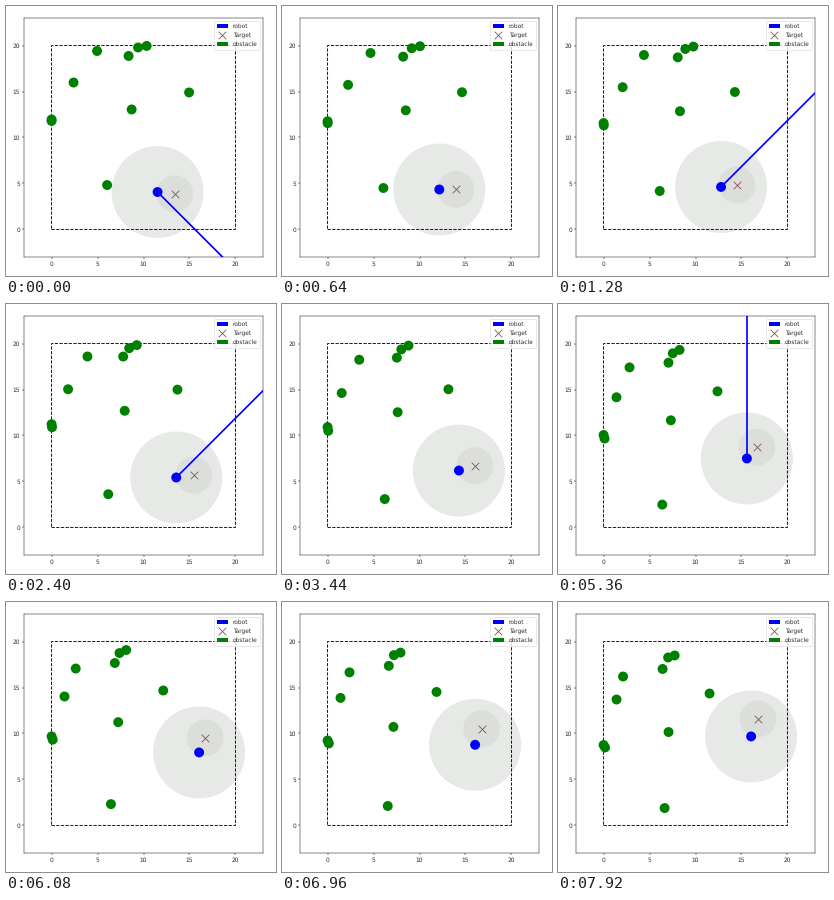
Write a matplotlib script that moves like this. It is 270 px wide and 270 px high and loops after 8 s.

```python
import numpy as np
import matplotlib.pyplot as plt
from matplotlib.animation import FuncAnimation
from matplotlib.patches import Circle

FRAMES, INTERVAL = 100, 80
SIZE, DPI = 270, 72
PT = 0.586  # shrinks matplotlib's default sizes to this small stage

plt.rcParams.update({
    "font.family": "DejaVu Sans", "font.size": 10 * PT, "text.hinting": "none",
    "text.color": "#2b2b2b", "xtick.labelcolor": "#2b2b2b",
    "ytick.labelcolor": "#2b2b2b",
    "axes.linewidth": 0.8 * PT, "patch.linewidth": PT,
    "xtick.major.size": 3.5 * PT, "ytick.major.size": 3.5 * PT,
    "xtick.major.width": 0.8 * PT, "ytick.major.width": 0.8 * PT,
    "xtick.major.pad": 3.5 * PT, "ytick.major.pad": 3.5 * PT,
})

# Paths are a few (step, x, y) waypoints.
ROBOT = [(0, 11.53, 4.07), (16, 12.78, 4.62), (58, 15.13, 7.06),
         (76, 16.05, 7.94), (99, 16.05, 9.68)]
TARGET = [(0, 13.40, 3.88), (30, 15.48, 5.68), (58, 16.65, 7.90),
          (99, 16.80, 11.60)]

# Each obstacle drifts from a start through a halfway point to an end.
DRIFTS = [
    ((0, 11.96), (0, 10.75), (0, 8.75)),
    ((0, 11.80), (0.08, 10.30), (0.16, 8.48)),
    ((2.39, 15.98), (1.40, 14.40), (1.41, 13.70)),
    ((4.95, 19.41), (3.20, 18.05), (2.12, 16.20)),
    ((8.38, 18.87), (7.40, 18.40), (6.42, 17.02)),
    ((9.41, 19.79), (7.80, 19.30), (7.02, 18.27)),
    ((10.34, 19.96), (8.55, 19.75), (7.73, 18.49)),
    ((14.96, 14.90), (12.85, 15.05), (11.53, 14.35)),
    ((8.71, 13.05), (7.45, 12.45), (7.07, 10.16)),
    ((6.04, 4.83), (6.25, 2.80), (6.64, 1.89)),
]
OBSTACLES = [[(step, *point) for step, point in zip((0, 50, 99), drift)]
             for drift in DRIFTS]


def position(path, step):
    steps, xs, ys = zip(*path)
    return np.interp(step, steps, xs), np.interp(step, steps, ys)


def heading(step):
    """Direction of the beam in degrees, or None while the robot waits."""
    if step < 3:
        return -45 if step % 2 == 0 else None
    return {0: 45, 2: 45, 4: 90}.get(step % 7)


fig = plt.figure(figsize=(SIZE / DPI, SIZE / DPI), dpi=DPI, facecolor="white")
ax = fig.add_axes([18 / SIZE, 19 / SIZE, 239 / SIZE, 239 / SIZE])
ax.set(xlim=(-3, 23), ylim=(-3, 23),
       xticks=range(0, 21, 5), yticks=range(0, 21, 5))


def disc(radius, color, zorder):
    return ax.add_patch(Circle((0, 0), radius, fc=color, ec="none", zorder=zorder))


sensor_range = disc(5, "#e6e9e6", 1)
target_zone = disc(2, "#dcdedb", 1.1)
ax.plot([0, 20, 20, 0, 0], [0, 0, 20, 20, 0], "k--", lw=1.5 * PT,
        snap=False, zorder=2)
obstacles = [disc(0.54, "green", 3) for _ in OBSTACLES]
target = ax.scatter([0], [0], marker="x", color="#80504c", s=7.6 ** 2,
                    lw=1.4 * PT, zorder=4)
beam, = ax.plot([], [], color="blue", lw=1.7, zorder=5)
robot = disc(0.54, "blue", 6)
ax.legend([robot, target, obstacles[0]], ["robot", "Target", "obstacle"],
          loc="upper right", labelspacing=0.55, handleheight=0.8).set_zorder(7)


def update(step):
    x, y = position(ROBOT, step)
    robot.center = sensor_range.center = x, y
    target_zone.center = position(TARGET, step)
    target.set_offsets([target_zone.center])
    for patch, path in zip(obstacles, OBSTACLES):
        patch.center = position(path, step)

    angle = heading(step)
    beam.set_visible(angle is not None)
    angle = np.radians(angle or 0)
    beam.set_data([x, x + 40 * np.cos(angle)], [y, y + 40 * np.sin(angle)])


anim = FuncAnimation(fig, update, frames=FRAMES, interval=INTERVAL,
                     init_func=lambda: update(0), repeat=True, repeat_delay=0)
plt.show()
```
